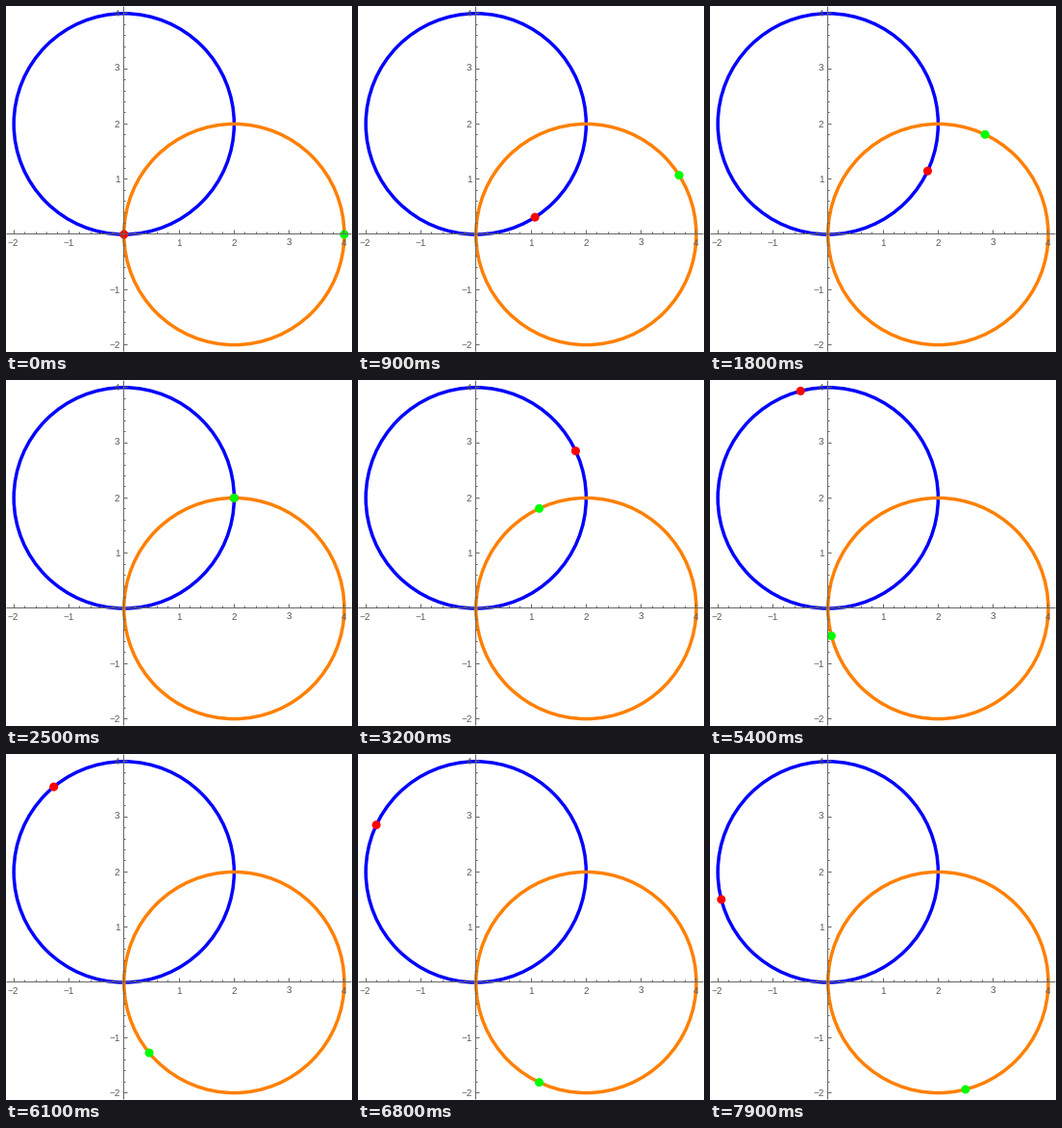
Animation, 360 px wide and 359 px high, one loop 8 s. Source, as a matplotlib script:

```python
import numpy as np
import matplotlib.pyplot as plt
from matplotlib.animation import FuncAnimation
from matplotlib.patches import Circle

W, H, DPI = 360, 359, 72
FRAMES, INTERVAL = 80, 100
STEP = 2 * np.pi / 100          # a full turn takes 100 frames
X0, Y0, UNIT = 122.75, 237.0, 57.3
AXIS_X, AXIS_Y = 122, 236       # pixel column and row of the axes
R = 2
GREY = "#666666"

plt.rcParams["font.family"] = "Liberation Sans"
plt.rcParams["text.hinting"] = "none"

fig = plt.figure(figsize=((W + 0.001) / DPI, (H + 0.001) / DPI), dpi=DPI,
                 facecolor="white")
ax = fig.add_axes([0, 0, 1, 1])
ax.set_xlim(0, W)
ax.set_ylim(H, 0)
ax.axis("off")


def px(x, y):
    return X0 + UNIT * x, Y0 - UNIT * y


def ring(x, y, color):
    ax.add_patch(Circle(px(x, y), R * UNIT, fill=False, ec=color, lw=3.5,
                        zorder=1))


def dot(color):
    return ax.add_patch(Circle((0, 0), 4.5, fc=color, ec="none", zorder=2))


def line(xs, ys):
    ax.plot(xs, ys, color=GREY, lw=1, solid_capstyle="butt", zorder=3)


def label(x, y, text, align):
    ax.text(x, y, text, size=10, color="#5a5a5a", ha=align, va="baseline",
            zorder=4)


def draw_axes():
    line([0, 359], [AXIS_Y, AXIS_Y])
    line([AXIS_X, AXIS_X], [0, 358])
    for k in range(-10, 21):
        if k == 0:
            continue
        major = k % 5 == 0
        size = 4 if major else 2
        x, y = px(k / 5, k / 5)
        # snapping rounds to the nearest pixel, so aim at its corner
        line([x - 0.5] * 2, [AXIS_Y, AXIS_Y - size])
        line([AXIS_X, AXIS_X + size], [y - 0.5] * 2)
        if major:
            text = str(k // 5).replace("-", "\u2212")
            label(x - 0.5, 249.4, text, "center")
            label(118.5, y + 3.2, text, "right")


ring(0, R, "#0000ff")
ring(R, 0, "#ff8000")
red, green = dot("#ff0000"), dot("#00ff00")
draw_axes()


def update(i):
    a = i * STEP
    red.center = px(R * np.sin(a), R - R * np.cos(a))
    green.center = px(R + R * np.cos(a), R * np.sin(a))
    return red, green


anim = FuncAnimation(fig, update, frames=FRAMES, interval=INTERVAL,
                     repeat=True, repeat_delay=0)
plt.show()
```
